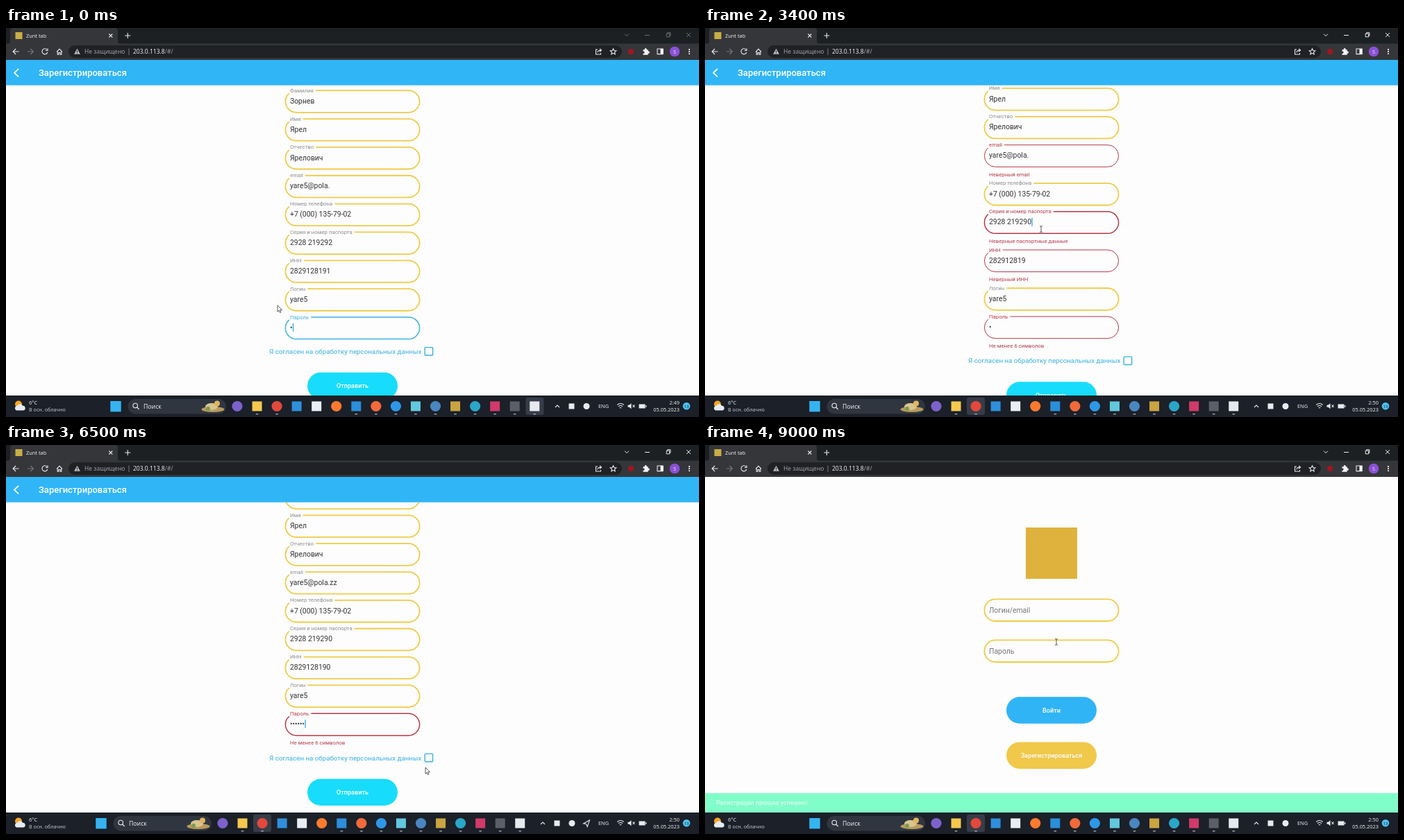
Recreate the animation shown at these times as an HTML page. Size 998 by 561 pixels, loop 9030 ms.

```html
<!DOCTYPE html>
<html lang="ru">
<head>
<meta charset="utf-8">
<title>Регистрация</title>
<style>
  html, body { margin: 0; width: 100%; height: 100%; overflow: hidden; background: #fdfdfd; }
  svg { display: block; width: 100%; height: 100%; }
  text { font-family: Roboto, sans-serif; font-size: 10.4px; white-space: pre; }
  .small { font-size: 7.8px; }
  .btn { font-size: 9.1px; font-weight: 500; fill: #fff; text-anchor: middle; }
  .ui text { font-family: "Noto Sans", "Open Sans", sans-serif; font-size: 7.4px; fill: #e8eaed; }
  .ui .addr { font-size: 8.5px; }
  .ui .dim { fill: #9aa0a6; }
  .line { fill: none; stroke: #e8eaed; stroke-width: 1.1; }
</style>
</head>
<body>
<svg viewBox="0 0 998 561" preserveAspectRatio="none">
  <defs><clipPath id="pill"><rect x="434" y="23.2" width="130" height="38.5" rx="19.2"/></clipPath></defs>
  <rect width="998" height="561" fill="#fdfdfd"/>

  <g id="login">
    <rect x="462" y="119" width="74" height="74" fill="#dfb23e"/>
    <g fill="none" stroke="#efcb49" stroke-width="1.8">
      <rect x="402.4" y="222.4" width="193.2" height="31.6" rx="15.8"/>
      <rect x="402.4" y="281.4" width="193.2" height="31.6" rx="15.8"/>
    </g>
    <text x="409" y="241.7" fill="#757575">Логин/email</text>
    <text x="409" y="300.5" fill="#757575">Пароль</text>
    <rect x="434" y="363.3" width="130" height="38.5" rx="19.2" fill="#30b4f6"/>
    <text class="btn" x="499" y="385.8">Войти</text>
    <rect x="434" y="428.4" width="130" height="38.5" rx="19.2" fill="#f0c84a"/>
    <text class="btn" x="499" y="450.9">Зарегистрироваться</text>
  </g>

  <g id="form">
    <rect y="46" width="998" height="484" fill="#fdfdfd"/>
    <g id="rows"></g>
    <g id="foot">
      <text x="379" y="-3.7" font-size="9.75" style="font-size:9.75px" fill="#38b0e2">Я согласен на обработку персональных данных</text>
      <rect id="box" x="603.2" y="-13" width="11.4" height="11.4" rx="1" stroke="#38b0e2" stroke-width="1.4"/>
      <path id="tick" d="M605.5-7.3l2.5 2.5 4.6-4.9" fill="none" stroke="#fff" stroke-width="1.4"/>
      <text id="consent" x="499" y="11.9" style="font-size:9.1px" text-anchor="middle" fill="#b5394a">Необходимо согласие на обработку персональных данных.</text>
      <rect x="434" y="23.2" width="130" height="38.5" rx="19.2" fill="#18dcfb"/>
      <g clip-path="url(#pill)" fill="#fff">
        <rect id="hover" x="434" y="23" width="130" height="39" opacity=".1"/>
        <circle id="ripple"/>
      </g>
      <text class="btn" x="499" y="45.8">Отправить</text>
    </g>
    <rect y="46" width="998" height="36.6" fill="#30b5f7"/>
    <path d="M18 58.8l-6 5.8 6 5.8" fill="none" stroke="#fff" stroke-width="1.8"/>
    <text x="47" y="69" style="font-size:13px;font-weight:500" fill="#fff">Зарегистрироваться</text>
  </g>

  <g id="snack">
    <rect y="502" width="998" height="60" fill="#80fdc8"/>
    <text id="snackText" x="16" y="519.3" style="font-size:9.1px;font-weight:500" fill="#fff">Регистрация прошла успешно!</text>
  </g>

  <g class="ui">
    <rect width="998" height="24" fill="#1d2023"/>
    <path d="M2 23q4 0 4-4V4q0-4 4-4h147q4 0 4 4v15q0 4 4 4z" fill="#35363a"/>
    <rect y="22.5" width="998" height="23.5" fill="#35363a"/>
    <rect x="13.5" y="6" width="10" height="10" fill="#c9ae45"/>
    <text x="29" y="13.7">Zunt tab</text>
    <path class="line" d="M148.3 8.5l5 5m0-5l-5 5M171.3 11h8m-4-4v8"/>
    <path id="controls" class="line" style="stroke-width:1" d="M891 8.6l3 3 3-3M920 10.5h7M951.2 8.2h4.4v4.6h-4.4zM952.6 8v-1.3h4.3v4.6h-1.2M980 7l6 6m0-6l-6 6"/>
    <path class="line" d="M18.5 34h-8.4m4-4l-4 4 4 4M59 31.2a4 4 0 1 0 .8 3.8M60 29.5v3h-3M73 34.3l4-4 4 4M74.2 33.5v4.8h1.7v-2.8h2.2v2.8h1.7v-4.8"/>
    <path class="line" style="stroke:#74777b" d="M31 34h8.4m-4-4l4 4-4 4"/>
    <rect x="90" y="25" width="797" height="18" rx="9" fill="#202124"/>
    <path d="M102.5 29.8l4.4 8h-8.8z" fill="#b7bbc0"/>
    <path d="M102.5 32.5v2.6m0 .8v1" stroke="#202124"/>
    <text class="addr dim" x="113" y="37.2">Не защищено</text>
    <path d="M177 29.5v9.5" stroke="#77797d"/>
    <text class="addr" x="183" y="37.2">203.0.113.8<tspan class="dim">/#/</tspan></text>
    <path class="line" d="M852 31h-2.5v7h7v-2M851.8 35.3q.5-3 4.8-3.2m-1.6-2.3l2.6 2.3-2.6 2.3M874.5 29.8l1.3 2.8 3 .3-2.3 2 .7 3-2.7-1.6-2.7 1.6.7-3-2.3-2 3-.3z"/>
    <circle cx="900" cy="34" r="4" fill="#a3161f"/>
    <path d="M917.5 31.2h2.2a1.6 1.6 0 1 1 3 0h2v2.4a1.6 1.6 0 1 1 0 3v2.2h-7.2v-2.3a1.5 1.5 0 1 0 0-2.8z" fill="#f1f3f4"/>
    <path class="line" d="M938 30h8v7.6h-8z"/><path d="M942.5 30h4v7.6h-4z" fill="#fff"/>
    <circle cx="963" cy="34" r="7.3" fill="#8b50d6"/>
    <text x="963" y="36.7" text-anchor="middle">S</text>
    <path d="M984 30v8" stroke="#e8eaed" stroke-width="1.9" stroke-dasharray="1.9 1.2"/>

    <rect y="530" width="998" height="31" fill="#1b2029"/>
    <circle cx="18" cy="542.5" r="5" fill="#f5a623"/>
    <path d="M15.5 551.5a3.3 3.3 0 0 1 .6-6.5 4.3 4.3 0 0 1 8-.2 3.4 3.4 0 0 1 1 6.7z" fill="#e6ebf2"/>
    <text x="33" y="543">6°C</text>
    <text x="33" y="553" class="dim" style="fill:#c3c7ce;font-size:7.2px">В осн. облачно</text>
    <g id="dock">
      <rect x="150.3" y="538" width="15.4" height="15.4" fill="#35b4f2"/>
      <rect x="175.5" y="535" width="141.5" height="21.5" rx="10.7" fill="#303640"/>
      <circle cx="186.2" cy="544.6" r="3.3" class="line"/><path class="line" d="M188.6 547l3 3"/>
      <text x="198" y="549" style="font-size:8.7px">Поиск</text>
      <ellipse cx="298" cy="550" rx="16.5" ry="4" fill="#b99a5c"/>
      <ellipse cx="296" cy="546" rx="9" ry="5" fill="#d9c58e"/>
      <circle cx="304" cy="541.5" r="4" fill="#e0b65e"/>
      <circle cx="291" cy="549" r="3" fill="#7d9a55"/>
      <rect id="tile" y="533" width="26" height="25" rx="3" fill="#373d48"/>
      <g id="icons"></g>
      <path class="line" d="M791 547l3-3 3 3"/>
      <rect x="810.5" y="541.5" width="8" height="8" fill="#e8eaed"/>
      <circle cx="836" cy="545.5" r="4.5" fill="#e8eaed"/>
      <path id="place" class="line" d="M852.5 546l9-5-3.3 9.5-1.8-4z"/>
    </g>
    <text x="853" y="548.3">ENG</text>
    <g class="line"><path d="M880.3 543.5q4.7-4 9.4 0M882 545.8q3-2.6 6 0M883.7 548q1.3-1.1 2.6 0M902.5 543.5l3 3.5m0-3.5l-3 3.5"/></g>
    <path d="M895.5 543.7h2l3-2.5v8l-3-2.5h-2zM911.5 542.5h9v6h-9zM921 544.2h1.4v2.6H921z" fill="#e8eaed"/>
    <text id="clock" x="970" y="543" text-anchor="end"></text>
    <text x="970" y="553" text-anchor="end">05.05.2023</text>
    <circle cx="980" cy="545.3" r="5.3" fill="#4cc2f1"/>
    <text x="980" y="547.6" text-anchor="middle" style="font-size:6px;fill:#123">13</text>
  </g>

  <g id="pointer">
    <path id="arrow" d="M0 0v9.2l2.1-1.9 1.4 3.2 1.5-.7-1.4-3.1h2.9z" fill="#fff" stroke="#333" stroke-width=".8"/>
    <path id="beam" d="M-2-4.5q2 0 2 1.2 0-1.2 2-1.2M0-3.5v7M-2 4.5q2 0 2-1.2 0 1.2 2 1.2" fill="none" stroke="#444" stroke-width=".9"/>
    <path id="hand" d="M-1 0q1.2-.9 2 .2v4l4 .9q1.3.4 1 2l-.8 4.4H.2l-3.2-4q-.3-1.2 1-.9l1 .8z" fill="#fff" stroke="#222" stroke-width=".8"/>
  </g>
</svg>

<script>
const LOOP = 9030, PITCH = 40.85, EXTRA = 14.4;
const YELLOW = [239, 203, 73], RED = [181, 57, 70], BLUE = [60, 176, 228], GREY = [140, 140, 140];

// on/off: error shown; focus: intervals; steps: value over time
const fields = [
  { label: 'Фамилия', steps: [[0, 'Зорнев']] },
  { label: 'Имя', steps: [[0, 'Ярел']] },
  { label: 'Отчество', steps: [[0, 'Ярелович']] },
  { label: 'email', steps: [[0, 'yare5@pola.'], [4330, 'yare5@pola.z'], [4480, 'yare5@pola.zz']],
    error: 'Неверный email', on: 1150, off: 5050, focus: [[4150, 5050]] },
  { label: 'Номер телефона', steps: [[0, '+7 (000) 135-79-02']] },
  { label: 'Серия и номер паспорта', steps: [[0, '2928 219292'], [2530, '2928 21929'], [3300, '2928 219290']],
    error: 'Неверные паспортные данные', on: 2850, off: 5050, focus: [[2380, 2850], [3100, 3700]] },
  { label: 'ИНН', steps: [[0, '2829128191'], [2130, '282912819'], [3900, '2829128190']],
    error: 'Неверный ИНН', on: 2850, off: 5050, focus: [[1930, 2380], [3700, 4150]] },
  { label: 'Логин', steps: [[0, 'yare5']] },
  { label: 'Пароль', steps: [[0, '•'], [5680, '••'], [5800, '•••'], [5920, '••••'], [6050, '•••••'], [6200, '••••••']],
    error: 'Не менее 6 символов', on: 1150, off: 6850, focus: [[0, 1150], [5500, 6850]] },
];

const scrollKeys = [[0, 0], [1500, 0], [1700, 44.1], [4620, 44.1], [4800, 72.9], [5050, 72.9],
  [5050, 29.7], [6850, 29.7], [6850, 15.3], [LOOP, 15.3]];

const mouseKeys = [[0, 391, 400], [450, 391, 400], [930, 521, 524], [1400, 521, 524], [1900, 484, 320],
  [2180, 484, 320], [2360, 484, 280], [2560, 484, 280], [2730, 500, 503], [2870, 500, 503],
  [3080, 484, 290], [3520, 484, 290], [3680, 484, 338], [3930, 484, 338], [4130, 490, 186],
  [4520, 490, 186], [4850, 508, 498], [5180, 508, 498], [5450, 470, 405], [6400, 470, 405],
  [6490, 604, 465], [6560, 604, 465], [6730, 515, 502], [6910, 515, 502], [7220, 629, 332],
  [7380, 629, 332], [7700, 607, 449], [7870, 607, 449], [8150, 508, 500], [8420, 508, 500],
  [8800, 506, 284], [LOOP, 506, 284]];

const presses = [1060, 2760, 4940, 6770, 8340];

const $ = id => document.getElementById(id);
const ramp = (t, from, len) => Math.min(1, Math.max(0, (t - from) / len));
const smooth = k => k * k * (3 - 2 * k);
const within = (t, a, b) => t >= a && t < b;
const mix = (a, b, k) => `rgb(${a.map((v, i) => Math.round(v + (b[i] - v) * k))})`;
const latest = (t, steps) => steps.filter(s => s[0] <= t).pop();
const show = (el, on) => el.setAttribute('display', on ? 'inline' : 'none');

function set(el, attrs) {
  for (const k in attrs) el.setAttribute(k, attrs[k]);
  return el;
}

function make(tag, attrs, parent, text) {
  const el = set(document.createElementNS('http://www.w3.org/2000/svg', tag), attrs);
  if (text) el.textContent = text;
  return parent.appendChild(el);
}

function track(t, keys) {
  let i = keys.length - 2;
  while (i > 0 && keys[i][0] > t) i--;
  const [t0, ...a] = keys[i], [t1, ...b] = keys[i + 1];
  const k = smooth(ramp(t, t0, t1 - t0 || 1));
  return a.map((v, j) => v + (b[j] - v) * k);
}

for (const f of fields) {
  f.g = make('g', {}, $('rows'));
  f.frame = make('rect', { x: 402.4, y: -15.8, width: 193.2, height: 31.6, rx: 15.8, fill: 'none' }, f.g);
  f.gap = make('rect', { x: 407.5, y: -18, height: 6.5, fill: '#fdfdfd' }, f.g);
  f.name = make('text', { x: 409, y: -13.3, class: 'small' }, f.g, f.label);
  f.value = make('text', { x: 409, y: 2.8, fill: '#333' }, f.g);
  f.caret = make('rect', { y: -7, width: 1.3, height: 12, fill: '#30a8e8' }, f.g);
  f.note = make('text', { x: 409, y: 29.3, class: 'small', fill: '#b5394a' }, f.g, f.error);
  f.gap.setAttribute('width', f.name.getComputedTextLength() + 4.5);
}

const icons = ['#7c62cc', '#f4c94e', '#e2493b', '#2f8fdc', '#e8eef4', '#ff7a2e', '#2b8fd9', '#f26a3a',
  '#2f97e8', '#62c8de', '#4a86c0', '#c9a440', '#2aa6c9', '#d13a6a', '#5a6068', '#e6e9ee'];
const round = [0, 2, 5, 7, 8, 10, 12], idle = [0, 3, 4, 5];
icons.forEach((fill, i) => {
  const x = 333 + i * 28.55;
  if (round.includes(i)) make('circle', { cx: x, cy: 545.5, r: 7.6, fill }, $('icons'));
  else make('rect', { x: x - 7, y: 538.5, width: 14, height: 14, fill }, $('icons'));
  if (!idle.includes(i)) make('rect', { x: x - 2, y: 556, width: 4, height: 1.4, rx: .7, fill: '#9aa1ab' }, $('icons'));
});

function drawField(f, t, y) {
  const failed = f.error && within(t, f.on, f.off);
  const red = f.error ? ramp(t, f.on, 100) * (1 - ramp(t, f.off + 40, 170)) : 0;
  const focus = (f.focus || []).find(([a, b]) => within(t, a, b));
  const [typed, value] = latest(t, f.steps);
  const calm = focus ? BLUE : YELLOW;
  set(f.g, { transform: `translate(0 ${y})` });
  set(f.frame, { stroke: mix(calm, RED, red), 'stroke-width': focus ? 1.5 : 1.8 - .8 * red });
  f.name.setAttribute('fill', mix(focus ? BLUE : GREY, RED, red));
  if (f.value.textContent !== value) f.value.textContent = value;
  f.note.setAttribute('opacity', failed ? ramp(t, f.on, 170) : 0);
  const lit = focus && (t - Math.max(typed, focus[0])) % 1000 < 500;
  show(f.caret, lit);
  if (lit) f.caret.setAttribute('x', 409.4 + f.value.getComputedTextLength());
  return failed ? EXTRA : 0;
}

function drawPointer(t, x, y, foot, centers) {
  const onLogin = t > 8550;
  const inField = (onLogin ? [238.2, 297.2] : centers).some(c => Math.abs(y - c) < 16.2);
  const onButton = !onLogin && x > 434 && x < 564 && Math.abs(y - foot - 42.5) < 19;
  const onBox = !onLogin && Math.abs(x - 609) < 9 && Math.abs(y - foot + 7) < 9;
  const kind = onButton || onBox ? 'hand' : inField && x > 402 && x < 596 ? 'beam' : 'arrow';
  for (const k of ['arrow', 'beam', 'hand']) show($(k), k === kind);
  set($('pointer'), { transform: `translate(${x} ${y})` });
  show($('hover'), onButton);
}

function draw(t) {
  let y = 106 - track(t, scrollKeys)[0];
  const centers = [];
  for (const f of fields) {
    centers.push(y);
    y += PITCH + drawField(f, t, y);
  }
  set($('foot'), { transform: `translate(0 ${y})` });

  const checked = t >= 7800;
  $('box').setAttribute('fill', checked ? '#38b0e2' : 'none');
  show($('tick'), checked);
  show($('consent'), within(t, 6850, 8400));

  const [mx, my] = track(t, mouseKeys);
  drawPointer(t, mx, my, y, centers);

  const press = presses.filter(p => p <= t).pop();
  const [px, py] = track(press || 0, mouseKeys);
  const age = press ? t - press : 1e4;
  set($('ripple'), { cx: px, cy: py - y < 62 && py - y > 23 ? py - y : 42,
    r: Math.min(130, age * .25), opacity: .14 * (1 - ramp(age, 220, 220)) });

  const leave = ramp(t, 8450, 260);
  set($('form'), { opacity: 1 - smooth(leave),
    transform: `translate(499 288) scale(${1 - .08 * smooth(leave)}) translate(-499 -288)` });
  show($('form'), leave < 1);
  const grow = 1.06 - .06 * smooth(leave);
  set($('login'), { transform: `translate(499 288) scale(${grow}) translate(-499 -288)` });
  show($('login'), leave > 0);

  set($('snack'), { transform: `translate(0 ${28 * (1 - smooth(ramp(t, 8760, 190)))})` });
  show($('snack'), t >= 8760);
  $('snackText').setAttribute('opacity', ramp(t, 8880, 170));

  const active = t >= 700, shifted = within(t, 6440, 7900);
  $('controls').style.stroke = active ? '#e8eaed' : '#6a6d72';
  $('tile').setAttribute('x', active ? 377 : 748.5);
  set($('dock'), { transform: `translate(${shifted ? -21 : 0} 0)` });
  show($('place'), shifted);
  $('clock').textContent = t < 2500 ? '2:49' : '2:50';
}

const start = performance.now();
function tick() {
  draw((performance.now() - start) % LOOP);
  requestAnimationFrame(tick);
}
tick();
</script>
</body>
</html>
```
